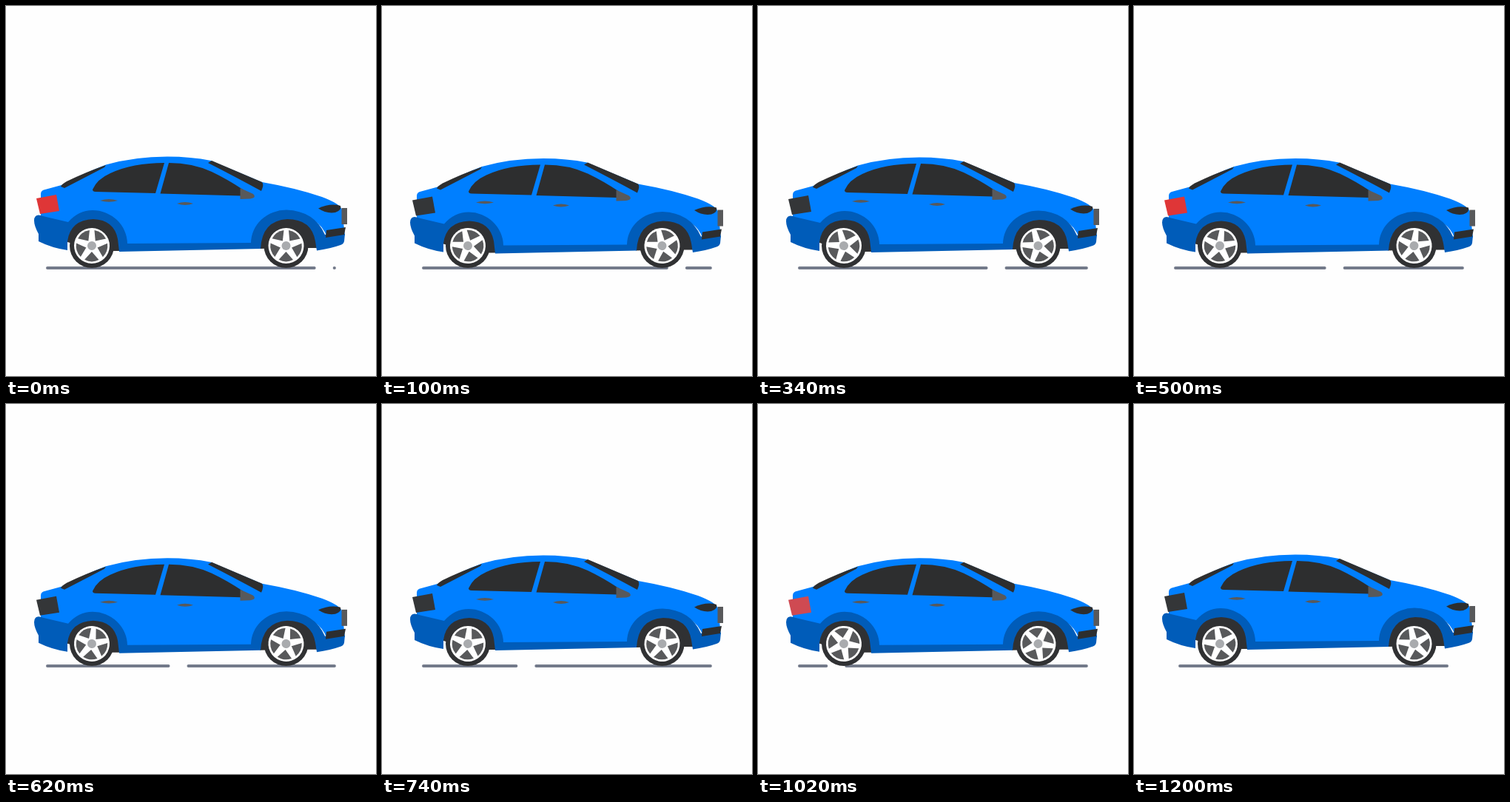
Recreate the animation shown at these times as an HTML page. Size 500 by 500 pixels, loop 1.22 s.

```html
<!DOCTYPE html>
<html lang="en">
<head>
<meta charset="utf-8">
<title>Driving car</title>
<style>
  html, body { margin: 0; width: 100%; height: 100%; overflow: hidden; background: #fefefe; }
  svg { display: block; width: 100vw; height: 100vh; }
  .paint { fill: #007fff; }
  .shade { fill: #005cb9; }
  .glass { fill: #2d2e2f; }
  .trim { fill: #58595b; }
  .arch { fill: #303133; }
</style>
</head>
<body>
<svg viewBox="0 0 500 500">
  <defs>
    <g id="rim">
      <circle r="24" fill="#fff"/>
      <g id="gaps" class="trim"></g>
      <circle r="6" fill="#a9abae"/>
    </g>
  </defs>

  <path id="road" d="M56 354H443.900" fill="none" stroke="#737a8a" stroke-width="4"
        stroke-linecap="round" stroke-dasharray="361 27"/>

  <g id="body">
    <path class="arch" d="M83 319V300Q92 287 116 287Q146 288 152 309L154 331H125Z"/>
    <path class="arch" d="M343 328V312Q350 288 380 287Q410 288 418 308L420 327H380Z"/>
    <path class="paint" d="M47 286V254Q47 249 53 248L75 242Q105 226 135 214.500Q174 203.500 218 203.500
      Q250 203.500 277 209L346 238Q392 246 427 258Q451 267 454 275L458 310L434 313
      Q424 282 381 282Q336 284 333 322L162 324Q158 286 122 284Q97 283 86 294Z"/>
    <path class="shade" d="M40 284Q43 281 50 284L84 292Q98 276 117 276A47 46 0 0 1 164 321L331 320
      A48 45 0 0 1 379 275.500Q417 277 431 309L458 308L457 318Q456 322 452 323Q438 328 420 330.500
      L418 318Q413 288 380 288Q346 290 344 328L153 332L151 315Q146 289 118 288
      Q87 289 83 318V330Q62 327 44 318V308Q38 297 38 290Q38 286 40 284Z"/>
    <path class="glass" d="M74 244Q75 241 82 237Q109 224 135 215L133 218Q110 230 79 246Z"/>
    <path class="glass" d="M117 248Q123 234 141 226Q171 212 214 212L202 253L121 251Q117 251 117 248Z"/>
    <path class="glass" d="M220 212Q252 212 278 224Q299 234 320 248L318 256.500L208.500 253.500Z"/>
    <path class="glass" d="M273 212L278 209L346 238Q349 241 345 250Q312 232 273 212Z"/>
    <path class="trim" d="M316.500 246L334 254Q339 259 330 260.500L316.500 261Z"/>
    <path class="trim" d="M127 263Q139 259 151 263Q139 266.500 127 263Z"/>
    <path class="trim" d="M231 267Q242 263 253 267Q242 271 231 267Z"/>
    <path class="glass" d="M422 273.500Q438 266 452 270Q454 276 445 279Q433 281 422 273.500Z"/>
    <path class="glass" d="M433 303L459 299L457 309L432 313Z"/>
    <path class="trim" d="M453.500 273H461V295H453.500Z"/>
    <path id="lamp" d="M41 260L68 255L72 277L46 281Z"/>
  </g>

  <g id="wheels">
    <g transform="translate(116 324)"><circle class="arch" r="30"/><use class="rim" href="#rim"/></g>
    <g transform="translate(378.500 324)"><circle class="arch" r="30"/><use class="rim" href="#rim"/></g>
  </g>
</svg>
<script>
  const LOOP = 1220, BOUNCE = 400, BLINK = 500;
  const $ = id => document.getElementById(id);
  const road = $("road"), body = $("body"), lamp = $("lamp");
  const rims = document.querySelectorAll(".rim");

  $("gaps").innerHTML = [0, 1, 2, 3, 4].map(i =>
    `<path d="M0 8L9.700 18.900A21.300 21.300 0 0 1 -9.700 18.900Z" transform="rotate(${i * 72})"/>`).join("");

  // time in the blink, lamp colour
  const lampSteps = [
    [0, [224, 53, 54]],
    [20, [209, 74, 82]],
    [100, [52, 54, 56]],
    [400, [52, 54, 56]],
    [500, [224, 53, 54]]
  ];

  function lampColour(t) {
    const i = lampSteps.findIndex(s => s[0] > t);
    const [t0, a] = lampSteps[i - 1], [t1, b] = lampSteps[i];
    const k = (t - t0) / (t1 - t0);
    return `rgb(${a.map((v, n) => Math.round(v + (b[n] - v) * k))})`;
  }

  function draw(t) {
    const p = t / LOOP;
    const drop = 2.5 * (1 - Math.cos(2 * Math.PI * t / BOUNCE));
    road.setAttribute("stroke-dashoffset", 388 * p);
    body.setAttribute("transform", `translate(0 ${drop})`);
    rims.forEach(r => r.setAttribute("transform", `rotate(${720 * p})`));
    lamp.setAttribute("fill", lampColour(t % BLINK));
  }

  const start = performance.now();
  function tick() {
    draw((performance.now() - start) % LOOP);
    requestAnimationFrame(tick);
  }
  tick();
</script>
</body>
</html>
```
